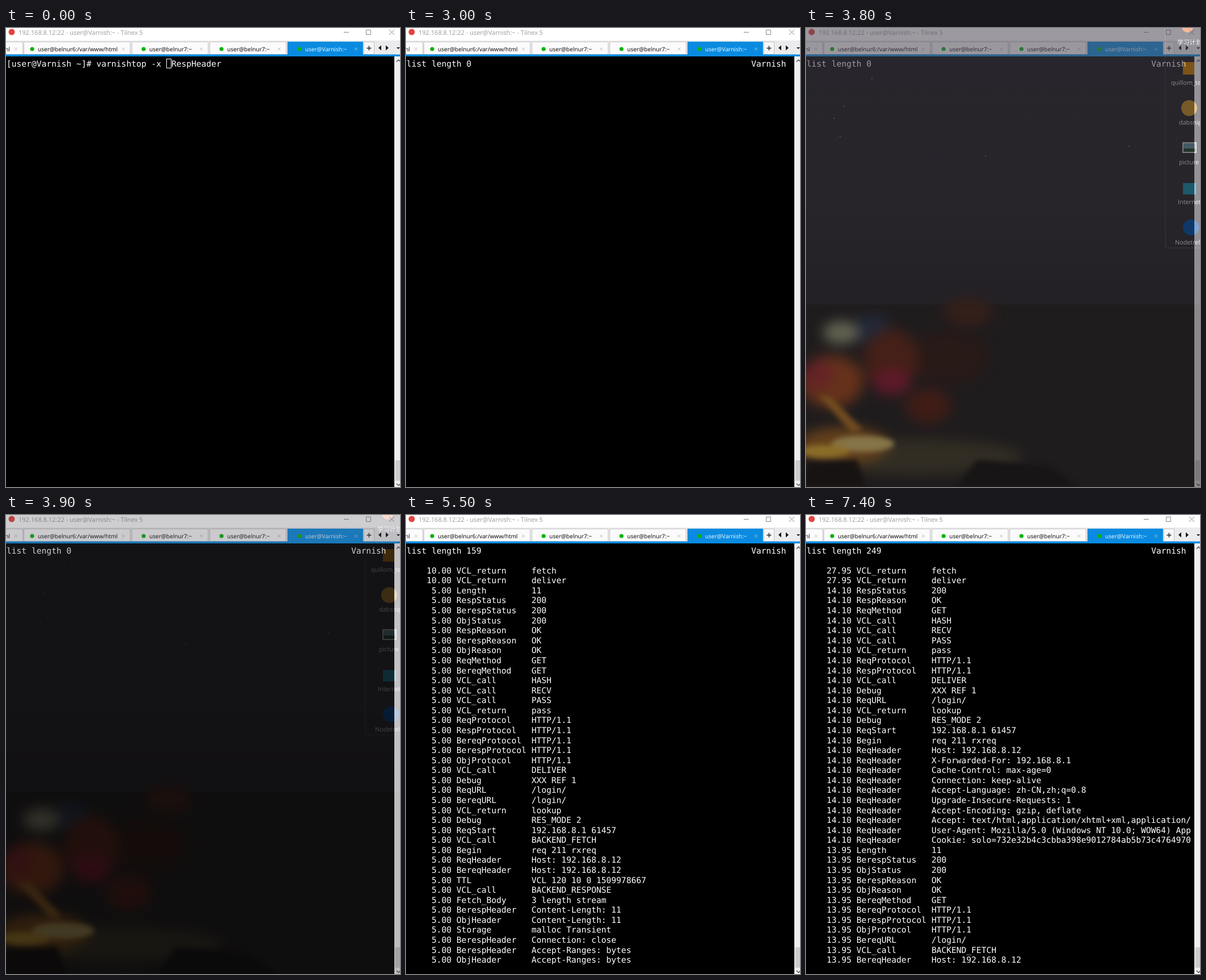
An HTML page for the animation above (8 s loop, 693 by 808 pixels).

```html
<!DOCTYPE html>
<html lang="en">
<head>
<meta charset="utf-8">
<title>Terminal session</title>
<style>
  html, body { margin: 0; width: 100%; height: 100%; overflow: hidden; background: #000; }
  svg { display: block; width: 693px; height: 808px; }
  text { text-rendering: geometricPrecision; }
  .ui { font: 10.1px "Open Sans", "Noto Sans", sans-serif; fill: #000; }
  .title { font-size: 11px; }
  .label { font: 10.8px "Open Sans", "Noto Sans CJK SC", sans-serif; fill: #fff; }
  .term { font: 14.59px "DejaVu Sans Mono", monospace; fill: #fff; }
  .soft { filter: blur(11px); }
  .glow { filter: blur(5px); }
</style>
</head>
<body>
<svg viewBox="0 0 693 808">
  <defs>
    <linearGradient id="sky" x2="0" y2="1">
      <stop offset="0" stop-color="#4a4652"/>
      <stop offset=".6" stop-color="#49454e"/>
      <stop offset="1" stop-color="#403c44"/>
    </linearGradient>
  </defs>

  <g id="desktop">
    <rect width="693" height="488" fill="url(#sky)"/>
    <rect y="487" width="693" height="321" fill="#3a3436"/>
    <path d="M48 158h2v2h-2zM66 137h2v2h-2zM59 190h2v2h-2zM115 88h2v2h-2zM315 225h2v2h-2zM567 207h2v2h-2z" fill="#8b91a0"/>
    <g class="soft">
      <ellipse cx="285" cy="500" rx="42" ry="24" fill="#62392f"/>
      <ellipse cx="250" cy="580" rx="70" ry="45" fill="#4a302b"/>
      <ellipse cx="115" cy="530" rx="32" ry="26" fill="#3f4b68"/>
      <ellipse cx="62" cy="536" rx="32" ry="20" fill="#b5b596"/>
      <ellipse cx="150" cy="585" rx="48" ry="55" fill="#7e3b2c"/>
      <ellipse cx="150" cy="622" rx="34" ry="24" fill="#aa3048"/>
      <ellipse cx="45" cy="622" rx="56" ry="46" fill="#b95b32"/>
      <ellipse cx="20" cy="610" rx="26" ry="26" fill="#b84044"/>
      <ellipse cx="215" cy="665" rx="40" ry="30" fill="#763529"/>
      <ellipse cx="190" cy="755" rx="190" ry="30" fill="#5c5442"/>
      <ellipse cx="65" cy="735" rx="80" ry="32" fill="#b87632"/>
    </g>
    <g class="glow">
      <path d="M20 645L45 650L100 708L80 712Z" fill="#d18a3a"/>
      <ellipse cx="100" cy="732" rx="55" ry="14" fill="#f5d684"/>
      <ellipse cx="32" cy="745" rx="45" ry="11" fill="#ffc84c"/>
      <path d="M0 764L90 760L105 808H0Z" fill="#2b2422"/>
      <path d="M265 808L300 760L430 772L480 808Z" fill="#2b2728"/>
    </g>
    <path d="M632 -1V387H694" fill="none" stroke="#666270"/>
    <circle cx="671" cy="-2" r="10" fill="#f0824a"/>
    <rect x="663" y="60" width="20" height="22" fill="#e59a2c"/>
    <circle cx="674" cy="141" r="14" fill="#d9a84a"/>
    <rect x="662" y="201" width="25" height="19" fill="#d8dde0"/>
    <rect x="664" y="203" width="21" height="9" fill="#7da6b8"/>
    <rect x="664" y="212" width="21" height="6" fill="#45604f"/>
    <rect x="663" y="273" width="23" height="20" fill="#36a3c4"/>
    <circle cx="677" cy="351" r="14" fill="#1c68c0"/>
    <g class="label">
      <text x="653" y="29">学习计划</text>
      <text x="642" y="100">quillom_te</text>
      <text x="656" y="170">dabsnip</text>
      <text x="656" y="240">picture</text>
      <text x="654" y="310">Internet</text>
      <text x="649" y="381">Nodetrel</text>
    </g>
  </g>

  <g id="window">
    <rect width="693" height="808" fill="#fff"/>
    <rect y="22" width="693" height="25" fill="#ebebed"/>
    <circle cx="10" cy="7" r="5.5" fill="#e2453c"/>
    <text id="title" class="ui title" x="22" y="11.5">192.168.8.12:22 - user@Varnish:~ - Tilnex 5</text>
    <path id="buttons" d="M594 7.5H603M633.5 3.5H641.5V11.5H633.5ZM674 3L683 12M683 3L674 12" fill="none"/>
    <g id="tabs"></g>
    <rect x="629.5" y="24.5" width="18" height="22" fill="#f7f7f7" stroke="#c4c4c6"/>
    <path d="M634.5 35.5H642.5M638.5 31.5V39.5" stroke="#222" stroke-width="1.4"/>
    <path d="M660 30.5V39.5L655 35ZM668 30.5V39.5L673 35ZM687 34H693L690 37Z" fill="#111"/>
    <rect y="46.5" width="693" height="3.5" fill="#0a8be0"/>
    <rect y="50" width="683" height="758" fill="#000"/>
    <rect x="683" y="50" width="10" height="758" fill="#f0f0f0"/>
    <rect x="684.5" y="761" width="8.5" height="36" fill="#cdcdcd"/>
    <path d="M687 59.5L690.5 56L694 59.5M687 802L690.5 805.5L694 802" fill="none" stroke="#555" stroke-width="1.5"/>
    <g id="screens" class="term"></g>
  </g>
</svg>

<script>
const NS = "http://www.w3.org/2000/svg";
const $ = id => document.getElementById(id);

function add(parent, tag, attrs = {}, text = "") {
  const node = document.createElementNS(NS, tag);
  for (const key in attrs) node.setAttribute(key, attrs[key]);
  node.textContent = text;
  return parent.appendChild(node);
}

// Window tabs: left edge, right edge, caption
const tabs = [
  [-159, 30, "user@belnur6:/var/www/html"],
  [31, 219, "user@belnur6:/var/www/html"],
  [221, 356, "user@belnur7:~"],
  [358, 493, "user@belnur7:~"],
  [495, 628, "user@Varnish:~"],
];
tabs.forEach(([left, right, caption], i) => {
  const active = i === tabs.length - 1;
  const textX = left + (i < 2 ? 25 : 31);
  const parent = $("tabs");
  add(parent, "rect", {
    x: left + .5, y: 24.5, width: right - left - 1, height: 22,
    fill: active ? "#0a8be0" : "#fbfbfb", stroke: active ? "#0a8be0" : "#c4c4c6",
  });
  if (i) add(parent, "circle", { cx: textX - 10, cy: 37, r: 3.6, fill: "#0ab40a" });
  const label = i ? { x: textX } : { x: 7, "text-anchor": "end" };
  add(parent, "text", { ...label, y: 40.5, class: "ui", style: active ? "fill:#fff" : "" }, caption);
  const x = right - 12.5;
  add(parent, "path", {
    d: `M${x - 2.5} 34.5l5 5m0 -5l-5 5`, stroke: active ? "#8cc8f2" : "#bbb",
  });
});

// Terminal grid
const colX = col => 1 + col * 8.785;
const rowY = row => 67.6 + row * 17.575;
const print = (screen, col, row, text, anchor = "start") =>
  add(screen, "text", { x: colX(col), y: rowY(row), "text-anchor": anchor }, text);

const earlyRows = `VCL_return fetch
VCL_return deliver
Length 11
RespStatus 200
BerespStatus 200
ObjStatus 200
RespReason OK
BerespReason OK
ObjReason OK
ReqMethod GET
BereqMethod GET
VCL_call HASH
VCL_call RECV
VCL_call PASS
VCL_return pass
ReqProtocol HTTP/1.1
RespProtocol HTTP/1.1
BereqProtocol HTTP/1.1
BerespProtocol HTTP/1.1
ObjProtocol HTTP/1.1
VCL_call DELIVER
Debug XXX REF 1
ReqURL /login/
BereqURL /login/
VCL_return lookup
Debug RES_MODE 2
ReqStart 192.168.8.1 61457
VCL_call BACKEND_FETCH
Begin req 211 rxreq
ReqHeader Host: 192.168.8.12
BereqHeader Host: 192.168.8.12
TTL VCL 120 10 0 1509978667
VCL_call BACKEND_RESPONSE
Fetch_Body 3 length stream
BerespHeader Content-Length: 11
ObjHeader Content-Length: 11
Storage malloc Transient
BerespHeader Connection: close
BerespHeader Accept-Ranges: bytes
ObjHeader Accept-Ranges: bytes`;

const lateRows = `VCL_return fetch
VCL_return deliver
RespStatus 200
RespReason OK
ReqMethod GET
VCL_call HASH
VCL_call RECV
VCL_call PASS
VCL_return pass
ReqProtocol HTTP/1.1
RespProtocol HTTP/1.1
VCL_call DELIVER
Debug XXX REF 1
ReqURL /login/
VCL_return lookup
Debug RES_MODE 2
ReqStart 192.168.8.1 61457
Begin req 211 rxreq
ReqHeader Host: 192.168.8.12
ReqHeader X-Forwarded-For: 192.168.8.1
ReqHeader Cache-Control: max-age=0
ReqHeader Connection: keep-alive
ReqHeader Accept-Language: zh-CN,zh;q=0.8
ReqHeader Upgrade-Insecure-Requests: 1
ReqHeader Accept-Encoding: gzip, deflate
ReqHeader Accept: text/html,application/xhtml+xml,application/
ReqHeader User-Agent: Mozilla/5.0 (Windows NT 10.0; WOW64) App
ReqHeader Cookie: solo=732e32b4c3cbba398e9012784ab5b73c4764970
Length 11
BerespStatus 200
ObjStatus 200
BerespReason OK
ObjReason OK
BereqMethod GET
BereqProtocol HTTP/1.1
BerespProtocol HTTP/1.1
ObjProtocol HTTP/1.1
BereqURL /login/
VCL_call BACKEND_FETCH
BereqHeader Host: 192.168.8.12`;

const screens = [];
function addScreen(start) {
  const node = add($("screens"), "g");
  screens.push({ start, node });
  return node;
}

// Rates: first two rows, rows up to 28, the rest
function addListing(start, length, rows = "", rates = []) {
  const screen = addScreen(start);
  print(screen, 0, 0, "list length " + length);
  print(screen, 69, 0, "Varnish");
  if (!rows) return;
  rows.split("\n").forEach((line, i) => {
    const [, tag, value] = line.match(/^(\S+) (.*)$/);
    const rate = rates[i < 2 ? 0 : i < 28 ? 1 : 2];
    print(screen, 9, i + 2, rate.toFixed(2), "end");
    print(screen, 10, i + 2, tag);
    print(screen, 25, i + 2, value);
  });
}

const prompt = addScreen(0);
print(prompt, 0, 0, "[user@Varnish ~]# varnishtop -x");
print(prompt, 33, 0, "RespHeader");
add(prompt, "rect", { x: 282.5, y: 54.5, width: 8, height: 16, fill: "none", stroke: "#fff" });

addListing(1000, 0);
addListing(5500, 159, earlyRows, [10, 5, 5]);
addListing(6500, 204, lateRows, [19, 9.55, 9.5]);
addListing(7400, 249, lateRows, [27.95, 14.1, 13.95]);

// Desktop peek: window opacity per 100 ms step
const peek = [.63, .45, .73];

function draw() {
  const t = performance.now() % 8000;
  const focused = t >= 200 && t < 3000;
  $("title").style.fill = focused ? "#000" : "#999";
  $("buttons").style.stroke = focused ? "#000" : "#888";
  $("window").style.opacity = t < 3700 ? 1 : peek[Math.floor((t - 3700) / 100)] ?? 1;
  screens.forEach(({ start, node }, i) => {
    const end = screens[i + 1]?.start ?? 8000;
    node.style.display = t >= start && t < end ? "" : "none";
  });
  requestAnimationFrame(draw);
}
draw();
</script>
</body>
</html>
```
